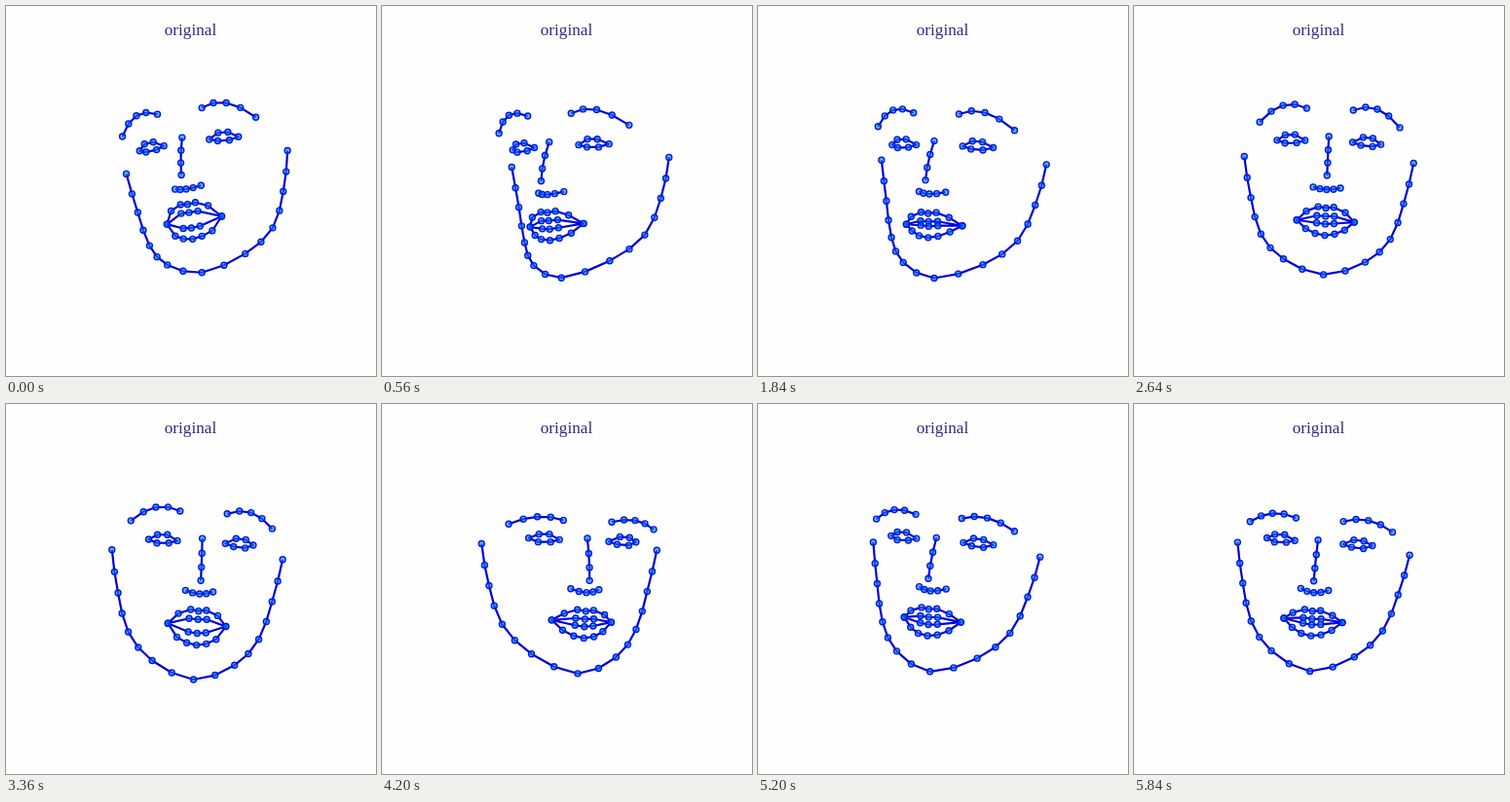
These frames come from a looping animation (380 px wide and 380 px high, 5.88 s). An HTML page with a canvas:

```html
<!DOCTYPE html>
<html lang="en">
<head>
<meta charset="utf-8">
<style>
  html, body { margin: 0; width: 100%; height: 100%; overflow: hidden; background: #fefefe; }
  canvas { display: block; }
  h1 { position: absolute; top: 15px; width: 379px; margin: 0; text-align: center;
       font: 17.2px/20px "Liberation Serif", serif; color: #2c2c84; }
</style>
</head>
<body>
<h1>original</h1>
<canvas id="stage" width="380" height="380"></canvas>
<script>
const ctx = document.getElementById("stage").getContext("2d");
const LOOP = 5880, STEP = 40;

// Head poses: position between the eyes, rotation in radians, size,
// vertical stretch, brow height and how far the mouth opens.
const poses = [
  { t: 0,    x: 188,   y: 141.5, yaw: .22,  pitch: -.05, roll: -.132, size: .985, tall: 1,    brow: 1,    open: 5.5 },
  { t: 1080, x: 179.7, y: 142,   yaw: .58,  pitch: .05,  roll: 0,     size: 1,    tall: .95,  brow: 1.02, open: -4 },
  { t: 2640, x: 200.2, y: 140,   yaw: .01,  pitch: 0,    roll: .04,   size: 1,    tall: 1,    brow: 1,    open: 0 },
  { t: 3360, x: 200.2, y: 142,   yaw: -.04, pitch: .075, roll: .06,   size: 1.01, tall: 1.02, brow: .93,  open: 4 },
  { t: 4200, x: 205.7, y: 139.7, yaw: -.17, pitch: .13,  roll: .06,   size: 1.05, tall: .95,  brow: .68,  open: 0 },
  { t: 5200, x: 189.2, y: 140,   yaw: .21,  pitch: .125, roll: .062,  size: 1.01, tall: .975, brow: .82,  open: 0 },
  { t: 5840, x: 190.7, y: 141.5, yaw: .06,  pitch: .14,  roll: .066,  size: 1.02, tall: .95,  brow: .8,   open: -1 }];

// Right half of the face as [x, y, depth], from the outside to the middle.
const jaw = [[87, 18, -73], [78.5, 60, -65], [66.5, 97, -46], [42, 121.5, -9], [0, 136, 20]];
const brow = [[72, -18, -11], [48.5, -36, 15], [24, -34, 24]];
const eye = [[53.3, 0, 0], [45, -5.8, 10], [35, -6.5, 12], [24.5, -1, 11], [33, 1.8, 10], [45, 2.6, 8]];
const bridge = [[0, -6, 29], [0, 14.5, 47], [0, 34, 56]];
const nostrils = [[14, 46.5, 32], [0, 48.5, 42]];
const corner = [29.5, 81, 23];
const upperLip = [[20, 71.5, 38], [8, 66.5, 43], [0, 67.5, 45]];
const lowerLip = [[20, 89.5, 34], [10, 94, 42], [0, 95.7, 43]];
const innerUpper = [[9, 75.7, 41], [0, 76, 43]];
const innerLower = [[9, 83.2, 40], [0, 84, 42]];

const mix = (a, b, u) => a + (b - a) * u;
const flip = ([x, y, z]) => [-x, y, z];
const mirror = half => [...half.map(flip), ...half.slice(0, -1).reverse()];
const shift = (part, dy) => part.map(([x, y, z]) => [x, y + dy, z]);

function poseAt(t) {
  const k = Math.max(1, poses.findIndex(p => p.t >= t));
  const a = poses[k - 1], b = poses[k], u = (t - a.t) / (b.t - a.t);
  const pose = {};
  for (const key in a) pose[key] = mix(a[key], b[key], u);
  // The head leans in slightly between poses.
  const lean = Math.sin(Math.PI * u);
  pose.size += .02 * lean;
  pose.y += 3 * lean;
  return pose;
}

function turn(a, b, angle) {
  const c = Math.cos(angle), s = Math.sin(angle);
  return [a * c - b * s, a * s + b * c];
}

function project([x, y, z], p) {
  [x, z] = turn(x, z, p.yaw);
  [z, y] = turn(z, y * p.tall, p.pitch);
  [x, y] = turn(x, y, p.roll);
  return [p.x + x * p.size, p.y + y * p.size];
}

// Samples n points on a Catmull-Rom curve.
function curve(points, n) {
  const m = points.length;
  const beyond = (a, b, c) => a.map((v, j) => 3 * v - 3 * b[j] + c[j]);
  const q = [beyond(...points), ...points, beyond(...points.slice(-3).reverse())];
  return Array.from({ length: n }, (_, i) => {
    const s = i / (n - 1) * (m - 1);
    const k = Math.min(m - 2, Math.floor(s)), u = s - k;
    return [0, 1, 2].map(j => {
      const [a, b, c, d] = q.slice(k, k + 4).map(v => v[j]);
      return b + u / 2 * (c - a + u * (2 * a - 5 * b + 4 * c - d + u * (3 * (b - c) + d - a)));
    });
  });
}

function drawPart(part, pose, closed) {
  const points = part.map(p => project(p, pose));
  ctx.beginPath();
  points.forEach(p => ctx.lineTo(...p));
  if (closed) ctx.closePath();
  ctx.lineWidth = 2.2;
  ctx.strokeStyle = "#0000d8";
  ctx.stroke();
  ctx.lineWidth = 1.4;
  ctx.strokeStyle = "#0018dc";
  ctx.fillStyle = "rgba(0, 128, 255, 0.6)";
  for (const [x, y] of points) {
    ctx.beginPath();
    ctx.arc(x, y, 3, 0, 2 * Math.PI);
    ctx.fill();
    ctx.stroke();
  }
}

function draw(t) {
  const pose = poseAt(t);
  const show = (part, closed) => drawPart(part, pose, closed);
  const lips = (upper, lower) => show([
    ...mirror([corner, ...shift(upper, -pose.open / 2)]),
    ...mirror(shift(lower, pose.open)).reverse()], true);

  ctx.clearRect(0, 0, 380, 380);
  ctx.lineJoin = "round";
  show(curve(mirror(jaw), 17));
  const raised = curve(brow, 5).map(([x, y, z]) => [x, y * pose.brow, z]);
  for (const side of [raised, raised.map(flip)]) show(side);
  for (const side of [eye, eye.map(flip)]) show(side, true);
  show(curve(bridge, 4));
  show(curve(mirror(nostrils), 5));
  lips(upperLip, lowerLip);
  lips(innerUpper, innerLower);
}

const start = performance.now();
function tick() {
  const t = (performance.now() - start) % LOOP;
  draw(Math.floor(t / STEP) * STEP);
  requestAnimationFrame(tick);
}
tick();
</script>
</body>
</html>
```
